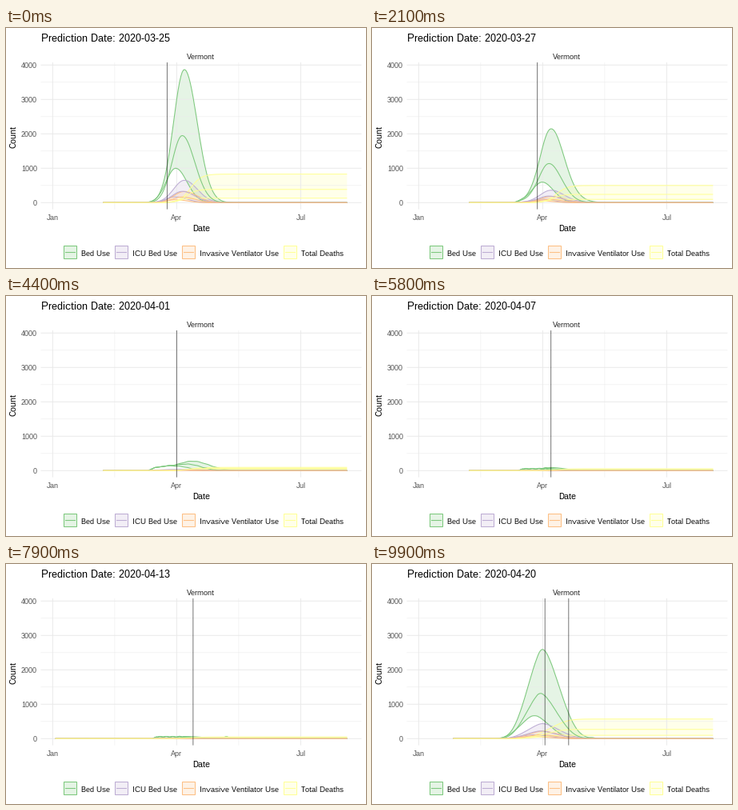
Recreate the animation shown at these times as a matplotlib script. Size 450 by 300 pixels, loop 10 s.

```python
import numpy as np
import matplotlib.pyplot as plt
from matplotlib.animation import FuncAnimation

plt.rcParams.update({
    "font.family": "Liberation Sans",
    "text.hinting": "native",
    "text.hinting_factor": 1,
    "path.snap": False,
})

W, H, DPI = 450, 300, 72            # at 72 dpi one point is one pixel
LEFT, RIGHT, TOP, BOTTOM = 43.5, 444.3, 43, 226.6
FRAMES, INTERVAL = 100, 100
LAST_DAY = 216
LINE = 1.07

COLORS = ["#7FC97F", "#BEAED4", "#FDC086", "#FFFF99"]
LABELS = ["Bed Use", "ICU Bed Use", "Invasive Ventilator Use", "Total Deaths"]
KEY_X = [72.5, 136.5, 220.5, 347.5]
SHARES = [1, 0.168, 0.084]          # bed, ICU and ventilator use

DATES = ["03-25", "03-26", "03-27", "03-29", "03-30", "03-31", "04-01",
         "04-05", "04-07", "04-08", "04-10", "04-13", "04-17", "04-20"]
STARTS = [4, 13, 20, 28, 35, 42, 49, 56, 63, 70, 77, 84, 91, 98]


def px(day):
    return 58.4 + 1.7033 * np.asarray(day)


def py(count):
    return 218.3 - 0.043 * np.asarray(count)


def day_of(date):
    month, day = map(int, date.split("-"))
    return {3: 59, 4: 90}[month] + day


def bell(d, peak, center, left, right):
    width = np.where(d < center, left, right)
    return peak * np.exp(-((d - center) / width) ** 2 / 2)


def logistic(d, total, center, scale):
    return total / (1 + np.exp(-(d - center) / scale))


def early(d):
    """Wide first forecast: bed and death curves, low to high."""
    beds = [bell(d, 1000, 90.2, 7.0, 8.3),
            bell(d, 1950, 95, 7.4, 9.2),
            bell(d, 3870, 96.6, 7.9, 9.4)]
    deaths = [logistic(d, 130, 93, 3.2),
              logistic(d, 385, 98, 3.6),
              logistic(d, 830, 101, 4.0)]
    return beds, deaths


def fitted(d, past, peaks, centers, widths, deaths, wiggle=0, bump=0):
    """Observed days up to day 85, then a fan of forecasts."""
    days, counts = past
    seen = np.interp(d, days, counts)
    beds = []
    for peak, c, w in zip(peaks, centers, widths):
        rise = np.sin(np.pi / 2 * np.clip((d - 85) / (c - 85), 0, 1)) ** 2
        ahead = counts[-1] + (peak - counts[-1]) * rise
        ahead = np.where(d > c, bell(d, peak, c, w, w), ahead)
        y = np.where(d < 85, seen, ahead)
        y = y + wiggle * np.sin(1.3 * d) * ((d > 76) & (d < 96))
        beds.append(y)
    beds[2] = beds[2] + bell(d, bump, 127.5, 1.6, 1.6)
    return beds, [logistic(d, t, c, 4.5) for t, c in zip(deaths, (94, 98, 101))]


MID_PAST = [70, 75, 80, 85], [0, 90, 115, 145]
LATE_PAST = [73, 76, 80, 85], [0, 48, 55, 55]
MID_C, MID_W = (92, 98.5, 102.5), (8, 10, 12)
LATE_C, LATE_W = (92, 94, 97), (8, 10, 14)


def curves(state):
    """First day and the twelve curves (series by level) of one state."""
    first = 37 if state < 9 else 2
    d = np.arange(first, LAST_DAY + 1.0)
    if state < 3:
        beds, deaths = early(d)
    elif state < 7:
        peaks, totals = {
            3: ((200, 350, 510), (60, 95, 170)),
            4: ((155, 230, 330), (40, 70, 105)),
            5: ((140, 210, 300), (38, 68, 100)),
            6: ((125, 190, 275), (36, 65, 95)),
        }[state]
        rough = 5 if state == 6 else 0
        beds, deaths = fitted(d, MID_PAST, peaks, MID_C, MID_W, totals)
        beds = [b + rough * np.sin(0.9 * d) * ((d > 85) & (d < 120))
                for b in beds]
    elif state < 9:
        beds, deaths = fitted(d, LATE_PAST, (45, 65, 90), LATE_C, (7, 8, 10),
                              (32, 40, 52), 8)
    else:
        top = {9: 72, 10: 66, 11: 62, 12: 63, 13: 66}[state]
        beds, deaths = fitted(d, LATE_PAST, (45, 52, top), LATE_C, LATE_W,
                              (30, 38, top - 14), 9, 58)
    series = [[s * b for b in beds] for s in SHARES] + [deaths]
    return d, series


STATES = [curves(s) for s in range(len(DATES))]


def stretch(d, y, n):
    """Resample to n points, adding the extra ones where y is steepest."""
    extra = n - len(d)
    steps = np.abs(np.diff(y))
    total = np.concatenate([[0], np.cumsum(steps)]) / steps.sum()
    place = np.arange(len(d)) + extra * total
    days = np.interp(np.arange(n), place, d)
    return days, np.interp(days, d, y)


def tween(a, b, t, k, level):
    da, ya = a[0], a[1][k][level]
    db, yb = b[0], b[1][k][level]
    n = max(len(da), len(db))
    if len(da) < n:
        da, ya = stretch(da, ya, n)
    if len(db) < n:
        db, yb = stretch(db, yb, n)
    return px(da + (db - da) * t), py(ya + (yb - ya) * t)


def phase(frame):
    """Current state and the progress towards the next one."""
    for i, start in enumerate(STARTS):
        steps = 4 if i == 2 else 3
        if frame < start:
            return i, 0
        if frame < start + steps - 1:
            return i, 0.5 if i == 0 else (frame - start + 1) / steps
    return len(STARTS) - 1, 0


fig = plt.figure(figsize=(W / DPI, H / DPI), dpi=DPI, facecolor="white")
ax = fig.add_axes([0, 0, 1, 1])
ax.set(xlim=(0, W), ylim=(H, 0))
ax.axis("off")


def rule(xs, ys, color, lw=LINE, **kw):
    return ax.plot(xs, ys, color=color, lw=lw, solid_capstyle="butt", **kw)[0]


def label(x, y, text, size=9, color="black", **kw):
    return ax.text(x, y, text, size=size, color=color, **kw)


for count in range(0, 4001, 500):
    rule([LEFT, RIGHT], [py(count)] * 2, "#EBEBEB",
         0.53 if count % 1000 else LINE)
    if count % 1000 == 0:
        label(39, py(count) + 3.5, str(count), color="#4D4D4D", ha="right")
for i, name in enumerate(["Jan", "", "Apr", "", "Jul"]):
    x = px(45.5 * i)
    rule([x, x], [TOP, BOTTOM], "#EBEBEB", 0.53 if i % 2 else LINE)
    label(x, 240, name, color="#4D4D4D", ha="center")

title = label(43.5, 17, "", 13)
label(243.5, 39, "Vermont", color="#1A1A1A", ha="center")
label(244, 254, "Date", 11, ha="center")
label(15, 136, "Count", 11, rotation=90, ha="right", va="center")

for x, color, name in zip(KEY_X, COLORS, LABELS):
    ax.add_patch(plt.Rectangle((x, 272.5), 16, 16, fc=color, alpha=0.2, lw=0))
    ax.add_patch(plt.Rectangle((x, 272.5), 16, 16, fill=False, ec=color,
                               lw=LINE))
    rule([x + 1.5, x + 14.5], [280.5] * 2, color)
    label(x + 21.5, 285, name)

fills, edges = [], []
for color in COLORS:
    fills.append(ax.fill([0, 0], [0, 0], fc=color, alpha=0.2, lw=0)[0])
    edges.append([rule([], [], color), None, rule([], [], color)])
for color, lines in zip(COLORS, edges):
    lines[1] = rule([], [], color)
marker = rule([], [], "black", alpha=0.5)
stay = rule([], [], "black", alpha=0.5)


def draw(frame):
    i, t = phase(frame)
    j = (i + 1) % len(DATES)
    title.set_text("Prediction Date: 2020-" + DATES[i])
    for k in range(4):
        paths = [tween(STATES[i], STATES[j], t, k, lv) for lv in range(3)]
        for line, path in zip(edges[k], paths):
            line.set_data(*path)
        (x0, y0), _, (x1, y1) = paths
        fills[k].set_xy(np.column_stack([np.r_[x1, x0[::-1]],
                                         np.r_[y1, y0[::-1]]]))
    now, then = day_of(DATES[i]), day_of(DATES[j])
    marker.set_data([px(now + (then - now) * t)] * 2, [TOP, BOTTOM])
    # the last date keeps its own line while the loop returns to the first
    stay.set_data([px(now)] * 2, [TOP, BOTTOM])
    stay.set_visible(j == 0 and t > 0)
    return [title, marker, stay, *fills, *sum(edges, [])]


anim = FuncAnimation(fig, draw, frames=FRAMES, interval=INTERVAL,
                     repeat=True, repeat_delay=0, blit=False)
plt.show()
```
